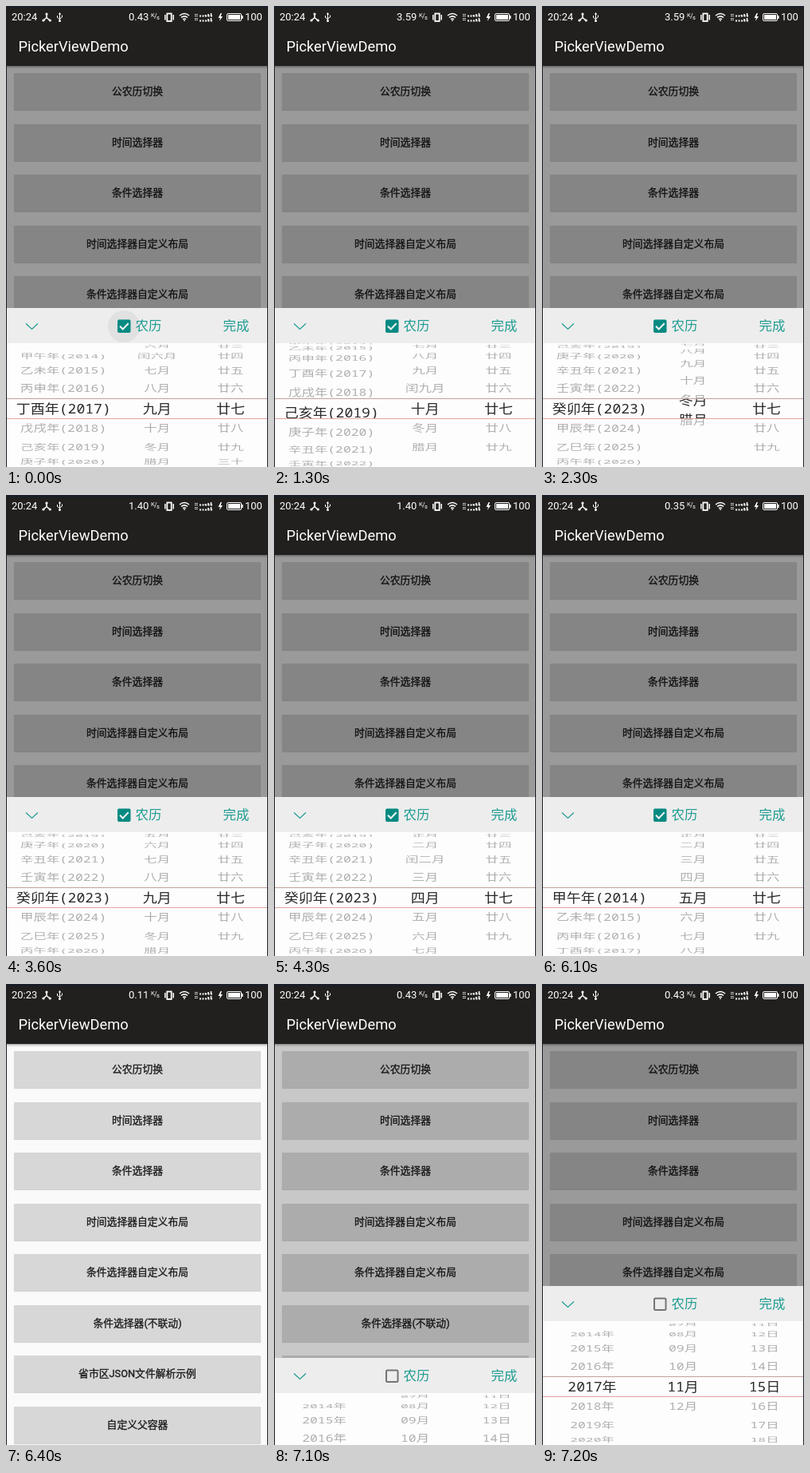
Write an HTML page with a canvas that moves like this. It is 329 px wide and 577 px high and loops after 7.4 s.

```html
<!DOCTYPE html>
<html lang="zh-CN">
<head>
<meta charset="utf-8">
<title>PickerViewDemo</title>
<style>
html, body { margin: 0; width: 100%; height: 100%; overflow: hidden; }
#stage {
  position: relative; width: 329px; height: 577px; overflow: hidden;
  background: #fafafa; color: #1e1e1e; user-select: none;
  font-family: Roboto, "Noto Sans CJK SC", "Noto Sans CJK", sans-serif;
}
#stage * { position: absolute; box-sizing: border-box; }
#bar { left: 0; top: 0; width: 329px; height: 75px; background: #21201e; color: #fff; box-shadow: 0 1px 3px rgba(0, 0, 0, .45); }
#bar span { white-space: nowrap; line-height: 16px; font-size: 13px; }
#edge { inset: 0; border: solid #1b1e26; border-width: 3px 1px 0; }
.btn {
  left: 10px; width: 310px; height: 46px; line-height: 46px; text-align: center;
  font-size: 12.8px; -webkit-text-stroke: .35px; background: #d6d7d6; border-radius: 1px;
  box-shadow: 0 1px 1px rgba(0, 0, 0, .18);
}
#dim { left: 0; top: 75px; width: 329px; height: 502px; background: #000; }
#panel { left: 0; top: 378px; width: 329px; height: 199px; background: #fdfdfd; }
#tools { left: 0; top: 0; width: 329px; height: 44px; background: #ededed; color: #1f9c92; font-size: 16.4px; line-height: 44px; }
#tools span { white-space: nowrap; }
#ripple { left: 128px; top: 3px; width: 40px; height: 40px; border-radius: 50%; background: #e1e1e1; }
canvas { left: 0; top: 44px; width: 329px; height: 155px; }
svg { left: 0; top: 0; overflow: visible; }
</style>
</head>
<body>
<div id="stage">
  <div id="list"></div>
  <div id="dim"></div>
  <div id="bar">
    <span id="clock" style="left:7px;top:6px"></span>
    <span id="speed" style="left:154px;top:6px"></span>
    <span style="left:300px;top:6px">100</span>
    <span style="left:15.5px;top:39px;font-size:18.28px;line-height:24px">PickerViewDemo</span>
    <svg width="329" height="30" fill="none" stroke="#fff" stroke-width="1.3">
      <text x="182" y="14" font-size="7.5" fill="#fff" stroke="none">K</text>
      <path d="M186.5 16l2.5-7" stroke-width=".7"/>
      <text x="189" y="17" font-size="7.5" fill="#fff" stroke="none">s</text>
      <path d="M51 10v4.5l-4 3.5M51 14.5l4 3.5" stroke-width="1.6"/>
      <g fill="#fff" stroke="none">
        <circle cx="51" cy="10" r="1.6"/><circle cx="47" cy="18" r="1.6"/><circle cx="55.3" cy="18" r="1.6"/>
        <circle cx="67.5" cy="18.5" r="1.5"/><path d="M65.7 10.5l1.8-2.5 1.8 2.5z"/>
        <path d="M269.5 9l-3 6h2.5l-1 4 4-6h-2.5l1.5-4z"/>
        <rect x="279" y="11" width="15" height="6"/><rect x="296" y="12" width="1.5" height="4"/>
      </g>
      <path d="M67.5 10v8M64.5 12v2.5l3 2M70.5 11.5v2.5l-3 2" stroke-width="1"/>
      <rect x="202.3" y="9.5" width="5.4" height="9.5" stroke-width="1.8"/><path d="M199.8 11v6.5M210.2 11v6.5" stroke-width="1.5"/>
      <path d="M218 12q6-5 12 0M220 14.4q4-3 8 0M222 16.7q2-1.500 4 0M224 17.500v1.500" stroke-width="1.6"/>
      <g stroke-width="1">
        <path d="M237 10.5h4M237 12.5h4M237 15.5h4M237 17.5h4" stroke-dasharray="1.5 .7"/>
        <path d="M243 12.5h16M243 18.5h16" stroke-width="1.8" stroke-dasharray="2 1.5"/>
        <path d="M250.5 11v2M254 10v3M257.5 9v4M254 16v3M257.5 15v4" stroke-width="1.6"/>
      </g>
      <rect x="277.5" y="9.5" width="18" height="9" rx="1.5" stroke-width="1"/>
    </svg>
  </div>
  <div id="panel">
    <canvas id="wheel"></canvas>
    <div id="tools">
      <div id="ripple"></div>
      <svg width="329" height="44" fill="none">
        <path d="M25 19.5l7.5 7 7.5-7" stroke="#1f9c92" stroke-width="1.2"/>
        <g id="on"><rect x="140" y="14.5" width="16.5" height="16.5" rx="2" fill="#058a82"/>
          <path d="M143 22.8l3.7 3.7 7-7.3" stroke="#f4f4f4" stroke-width="2"/></g>
        <rect id="off" x="141" y="15.5" width="14.5" height="14.5" rx="1.5" stroke="#747474" stroke-width="2"/>
      </svg>
      <span style="left:162.5px;top:1px">农历</span>
      <span style="left:272.5px;top:1px">完成</span>
    </div>
  </div>
  <div id="edge"></div>
</div>
<script>
const $ = id => document.getElementById(id);
const LOOP = 7400, TICK = 100;
const W = 329, H = 155, MID = 82, LINES = [69.5, 94.5];
const RADIUS = 81.5, STEP = Math.PI / 10;

['公农历切换', '时间选择器', '条件选择器', '时间选择器自定义布局', '条件选择器自定义布局',
 '条件选择器(不联动)', '省市区JSON文件解析示例', '自定义父容器'].forEach((label, i) => {
  const b = document.createElement('div');
  b.className = 'btn';
  b.textContent = label;
  b.style.top = 84 + i * 63.5 + 'px';
  $('list').append(b);
});

const ctx = $('wheel').getContext('2d');
const dpr = window.devicePixelRatio || 1;
$('wheel').width = W * dpr;
$('wheel').height = H * dpr;

// Keys are [time, value] pairs
function at(keys, t) {
  if (t <= keys[0][0]) return keys[0][1];
  for (let i = 1; i < keys.length; i++) {
    const [t0, a] = keys[i - 1], [t1, b] = keys[i];
    if (t <= t1) return a + (b - a) * (t - t0) / (t1 - t0);
  }
  return keys[keys.length - 1][1];
}
// Keys are [start, value] pairs, held until the next one
const held = (keys, t) => keys.filter(k => k[0] <= t).pop()[1];

const YEAR = [[400, 2017], [500, 2016.5], [700, 2015], [900, 2014], [1000, 2014], [1100, 2015.5],
  [1300, 2018.8], [1500, 2021.4], [1800, 2023], [4300, 2023], [4500, 2021.4], [4800, 2016.46],
  [4900, 2015.1], [5000, 2014]];
const MONTH = [[800, 9], [900, 10], [1800, 10], [1900, 11], [2200, 11], [2300, 11.43], [2400, 11.8],
  [2600, 12], [3000, 12], [3100, 11.4], [3300, 9.5], [3400, 9], [3800, 9], [3900, 8.4], [4100, 5.5], [4300, 4]];
const LEAP = [[0, 6], [900, 9], [1900, 2], [5200, 9]];
const DAYS = [[0, 30], [1100, 29], [2900, 30], [3600, 29], [4400, 30], [5200, 29]];
const SPEED = [[0, '0.43'], [900, '3.59'], [3400, '1.40'], [6100, '0.35'], [6400, '0.11'], [6900, '0.43']];

const pad = n => String(n).padStart(2, '0');
const range = (n, f) => Array.from({ length: n }, (_, i) => f(i));

function lunarYear(y) {
  return '甲乙丙丁戊己庚辛壬癸'[(y - 4) % 10] + '子丑寅卯辰巳午未申酉戌亥'[(y - 4) % 12] + `年(${y})`;
}
function lunarMonths(leap) {
  const m = [...'正二三四五六七八九十冬腊'].map(c => c + '月');
  m.splice(leap, 0, '闰' + m[leap - 1]);
  return m;
}
function lunarDay(i) {
  if (i === 9) return '初十';
  if (i === 19) return '二十';
  if (i === 29) return '三十';
  return '初十廿'[Math.floor(i / 10)] + '一二三四五六七八九'[i % 10];
}

function rows(items, pos, x, centre) {
  items.forEach((text, i) => {
    const a = (i - pos) * STEP;
    if (Math.abs(a) >= Math.PI / 2) return;
    ctx.save();
    ctx.translate(x, MID + RADIUS * Math.sin(a));
    ctx.scale(centre ? 1.1 : 1, Math.cos(a) * (centre ? 1 : 0.8));
    ctx.fillText(text, 0, 5.6);
    ctx.restore();
  });
}

function band(top, bottom, centre, columns) {
  ctx.save();
  ctx.beginPath();
  ctx.rect(0, top, W, bottom - top);
  ctx.clip();
  ctx.fillStyle = centre ? '#2a2a2a' : '#aeaeae';
  columns.forEach(c => rows(...c, centre));
  ctx.restore();
}

function drawWheel(columns) {
  ctx.setTransform(dpr, 0, 0, dpr, 0, 0);
  ctx.clearRect(0, 0, W, H);
  ctx.font = '16.4px "Noto Sans Mono", "Noto Sans CJK SC", "Noto Sans CJK", monospace';
  ctx.textAlign = 'center';
  band(0, LINES[0], false, columns);
  band(LINES[0], LINES[1], true, columns);
  band(LINES[1], H, false, columns);
  ctx.fillStyle = '#c0a29d';
  ctx.fillRect(0, 69, W, 1);
  ctx.fillStyle = '#e3a59d';
  ctx.fillRect(0, 94, W, 1);
}

function draw(t) {
  const solar = t >= 7100;
  const open = t < 6400 || solar;
  const entering = t === 7100;
  $('clock').textContent = t >= 6400 && t < 6900 ? '20:23' : '20:24';
  $('speed').textContent = held(SPEED, t);
  $('panel').style.display = open ? '' : 'none';
  $('panel').style.transform = entering ? 'translateY(90px)' : '';
  $('dim').style.opacity = !open ? 0 : entering ? 0.2 : 0.385;
  $('ripple').style.opacity = at([[400, 1], [700, 0]], t) * !solar;
  $('on').style.display = solar ? 'none' : '';
  $('off').style.display = solar ? '' : 'none';
  if (!open) return;
  drawWheel(solar ? [
    [range(14, i => 2014 + i + '年'), 3, 63],
    [range(12, i => pad(i + 1) + '月'), 10, 177],
    [range(30, i => pad(i + 1) + '日'), 14, 279.5]
  ] : [
    [range(14, i => lunarYear(2014 + i)), at(YEAR, t) - 2014, 72.2],
    [lunarMonths(held(LEAP, t)), at(MONTH, t), 189.7],
    [range(held(DAYS, t), lunarDay), 26, 282]
  ]);
}

const start = performance.now();
let last = -1;
function frame() {
  const t = Math.floor((performance.now() - start) % LOOP / TICK) * TICK;
  if (t !== last) draw(last = t);
  requestAnimationFrame(frame);
}
frame();
</script>
</body>
</html>
```
